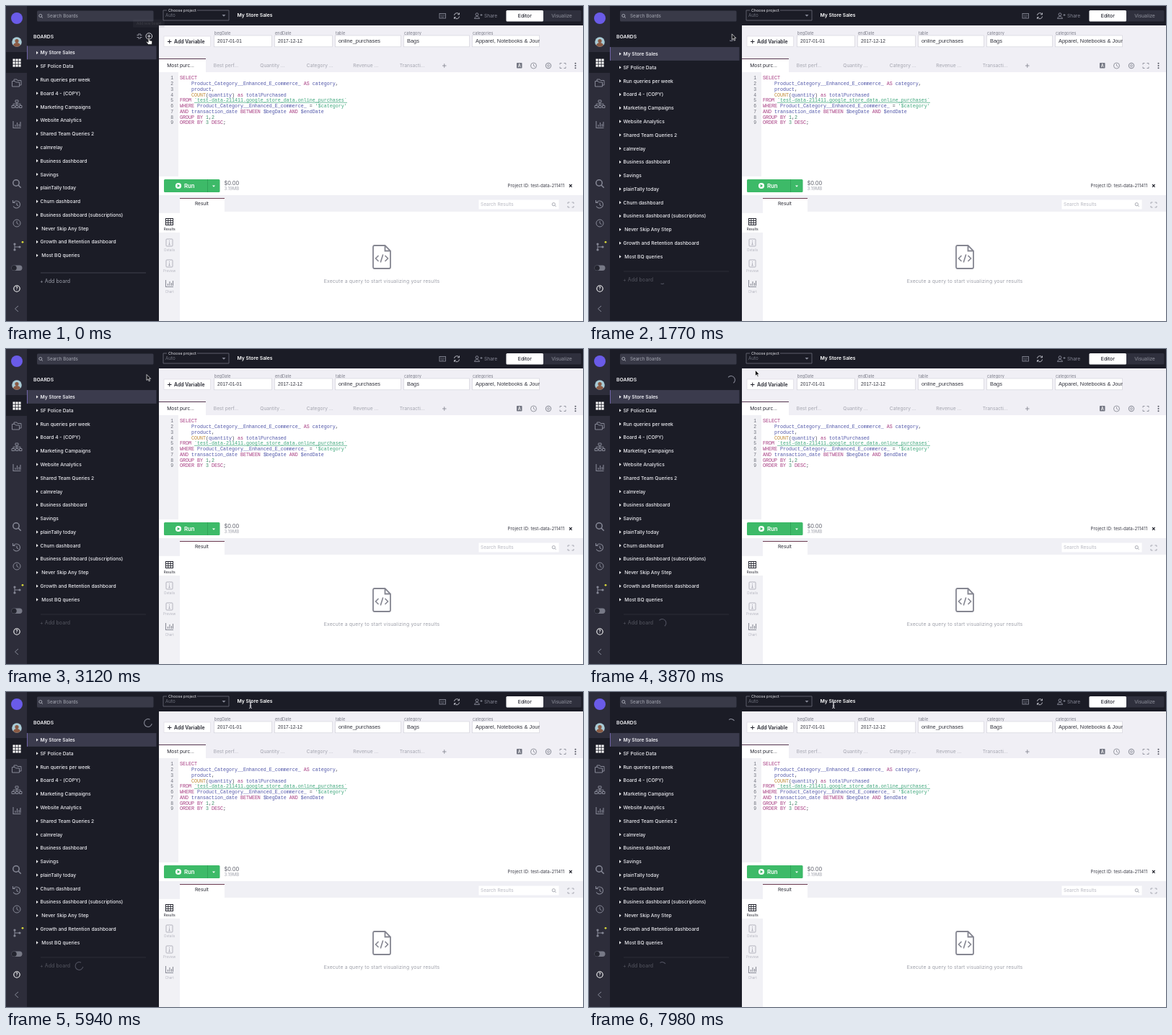
Recreate the animation shown at these times as an HTML page. Size 800x438 px, loop 8 s.

```html
<!DOCTYPE html>
<html lang="en">
<head>
<meta charset="utf-8">
<title>Query editor</title>
<style>
html, body { margin: 0; height: 100%; overflow: hidden; background: #fff; }
svg { display: block; width: 100vw; height: 100vh; font-family: Inter, "Liberation Sans", sans-serif; }
text { white-space: pre; }
.mono { font-family: "Liberation Mono", "DejaVu Sans Mono", monospace; }
.arial { font-family: "Liberation Sans", sans-serif; }
</style>
</head>
<body>
<svg id="stage" viewBox="0 0 800 438"></svg>
<script>
const LOOP = 8000, LOAD = 1390, SPIN = 434;
const GREY = '#868896', DIM = '#b3b3bd', INK = '#24252f';
const stage = document.getElementById('stage');

// Builders; text is placed by its vertical middle.
const esc = s => s.replace(/&/g, '&amp;').replace(/</g, '&lt;');
const text = (x, y, s, size, fill, more = '') =>
  `<text x="${x}" y="${y + size * .36}" font-size="${size}" fill="${fill}" ${more}>${esc(s)}</text>`;
const rect = (x, y, w, h, fill, more = '') =>
  `<rect x="${x}" y="${y}" width="${w}" height="${h}" fill="${fill}" ${more}/>`;
const line = (d, stroke, w = 1, more = '') =>
  `<path d="${d}" fill="none" stroke="${stroke}" stroke-width="${w}" ${more}/>`;
const shape = (d, fill, more = '') => `<path d="${d}" fill="${fill}" ${more}/>`;
const ring = (x, y, r, stroke, w = 1) =>
  `<circle cx="${x}" cy="${y}" r="${r}" fill="none" stroke="${stroke}" stroke-width="${w}"/>`;
const disc = (x, y, r, fill) => `<circle cx="${x}" cy="${y}" r="${r}" fill="${fill}"/>`;
const BOLD = 'font-weight="600"', MEDIUM = 'font-weight="500"', MID = 'text-anchor="middle"';

// Icons
const lens = (x, y, r, c, w) => ring(x, y, r, c, w) +
  line(`M${x + r * .7} ${y + r * .7}l${r * .9} ${r * .9}`, c, w);
const clock = (x, y, r, c) => ring(x, y, r, c) + line(`M${x} ${y - r * .6}V${y}l${r * .5} ${r * .35}`, c);
const bars = (x, y, c) =>
  line(`M${x - 5} ${y - 5}v9.5h10.5M${x - 2} ${y + 3}v-3M${x + .5} ${y + 3}v-6M${x + 3} ${y + 3}v-4M${x + 5} ${y + 3}v-7`, c, 1.1);
const grid = (x, y, c) => rect(x - 5, y - 4.5, 10, 9, 'none', `stroke="${c}"`) +
  line(`M${x - 5} ${y - 1.5}h10m-10 3h10M${x - 1.7} ${y - 4.5}v9m3.4 -9v9`, c, .9);
const corners = (x, y, c) =>
  line(`M${x - 4} ${y - 1.5}v-2h2.5m3 0h2.5v2m0 3v2h-2.5m-3 0h-2.5v-2`, c, .9);
const info = (x, y) => rect(x - 4.5, y - 5, 9, 10, 'none', `stroke="${DIM}" rx="1"`) +
  line(`M${x} ${y - 3}v1.3m0 1v3.6m-1.3 0h2.6`, DIM, 1);

function rail() {
  let s = rect(0, 0, 29, 438, '#2d2d3a') + rect(0, 64, 29, 29, '#1c1d27');
  s += disc(15, 17, 8, '#6a5be8');
  s += disc(15, 50, 6.8, '#a9cbd6') + disc(15, 48.5, 2.6, '#8a5a44') + shape('M10 54.5q1-3.6 5-3.6t5 3.6q-5 4.500-10 0z', '#8a5a44');
  for (let i = 0; i < 9; i++) s += rect(9.5 + i % 3 * 4, 73.5 + (i / 3 | 0) * 4, 3.1, 3.1, '#fff');
  s += line('M11 104v-2h4l1 1.500h5v6.500h-2M8.500 104.500h4l1 1.500h5v6h-10z', GREY);
  s += line('M13 131h4v3h-4zM8 138.500h4v3h-4zM13.500 138.500h3.500v3h-3.500zM18.500 138.500h3.500v3h-3.500zM15 134v4.500M10 138.500v-2.300h10v2.300', GREY);
  s += bars(15, 165, GREY) + lens(14, 246, 4.2, GREY, 1.5);
  s += line('M10.500 273a5 5 0 1 1-.300 5.500M9.500 270v3.500h3.500M15 273.500v3l2 1.200', GREY, 1.1) + clock(15, 302, 5, GREY);
  s += line('M12 332v6M12 335h6', GREY) + disc(12, 331, 1.6, GREY) + disc(12, 339, 1.6, GREY) + disc(19, 335, 1.6, GREY) + disc(23, 328.3, 1.4, '#d9d83a');
  s += rect(7.5, 360.5, 15, 7.5, '#777986', 'rx="3.700"') + disc(11.2, 364.2, 3.5, '#24252f');
  s += ring(15, 393, 4.2, '#fff', 1.1) + text(15, 393, '?', 6.2, '#fff', `${BOLD} ${MID}`);
  return s + line('M17 417l-4.500 4 4.500 4', GREY);
}

function boards() {
  const names = ['My Store Sales', 'SF Police Data', 'Run queries per week', 'Board 4 - (COPY)',
    'Marketing Campaigns', 'Website Analytics', 'Shared Team Queries 2', 'calmrelay',
    'Business dashboard', 'Savings', 'plainTally today', 'Churn dashboard',
    'Business dashboard (subscriptions)', ' Never Skip Any Step', 'Growth and Retention dashboard', ' Most BQ queries'];
  let s = rect(29, 0, 183, 438, '#1b1c26') + rect(43, 6.5, 161.5, 15, '#393a48', 'rx="1.500"');
  s += lens(47.8, 13.5, 2, '#aeb0bb', .9) + text(57, 14, 'Search Boards', 6.2, '#a9abb6');
  s += text(38, 43, 'BOARDS', 6.8, '#f2f2f6', BOLD);
  s += '<g id="list">' + rect(29, 55.5, 179.5, 18.8, '#3b3b4d') + rect(29, 55.5, 1, 18.8, '#7064a8');
  names.forEach((name, i) => {
    const y = 65 + i * 18.79;
    s += shape(`M42 ${y - 2.2}l2.700 2.200-2.700 2.200z`, '#eee') +
      text(47.5, y, name, 6.7, '#eeeef3', i ? MEDIUM : BOLD);
  });
  s += '</g><g id="tools">' + line('M181.500 40.500h2.500v-2.500M188.500 40.500h-2.500v-2.500M181.500 43.500h2.500v2.500M188.500 43.500h-2.500v2.500', '#a5a6b2', .9);
  s += ring(198.3, 42, 4.3, '#d5d5dc') + line('M196 42h4.600M198.300 39.700v4.600', '#d5d5dc') + '</g>';
  return s + '<g id="add">' + line('M48 371H194', '#494a57', .8) + text(47, 382.4, '+ Add board', 7, '#9b9da8', 'letter-spacing=".08"') + '</g>';
}

function header() {
  let s = rect(212, 0, 588, 27, '#1b1c26') + line('M223 6h-5v14h91V6h-44', '#656673', .9);
  s += text(225, 6.5, 'Choose project', 5.4, '#e3e3e8') + text(221, 13.2, 'Auto', 6.3, '#6e707c') + shape('M299.500 12h5l-2.500 2.800z', GREY);
  s += text(320.5, 12.3, 'My Store Sales', 6.8, '#fff', BOLD);
  s += rect(601, 10.5, 8.5, 6.5, 'none', `stroke="${GREY}" stroke-width=".9"`) + line('M602.500 12.700h6m-6 1.500h6M603.500 15.700h3.500', GREY, .7, 'stroke-dasharray="1 .600"');
  s += line('M621.500 13a3.600 3.600 0 0 1 6.700-1.500M628.500 14.500a3.600 3.600 0 0 1-6.700 1.500M628.500 9.500v2.300h-2.400M621.500 18v-2.300h2.400', '#b6b7c0');
  s += ring(653, 11.7, 1.9, GREY) + line('M649.500 17.500q0-2.800 3.500-2.800t3.500 2.800zM657.500 12.500h3M659 11v3', GREY, .9);
  s += text(663, 14, 'Share', 6.6, GREY);
  s += rect(693.5, 6, 104, 15.5, '#2f303d', 'rx="1.500"') + rect(693.5, 6, 51.5, 15.5, '#fff', 'rx="1.500"');
  return s + text(719.3, 14, 'Editor', 6.8, INK, `${MEDIUM} ${MID}`) + text(770.5, 14, 'Visualize', 6.8, '#92949f', MID);
}

function variables() {
  let s = rect(212, 27, 588, 65, '#f0eff5');
  s += rect(219, 42, 64.5, 14.5, '#fff', 'stroke="#d9d8e0" stroke-width=".600"') + line('M224 49.500h5.500M226.750 46.700v5.600', INK) + text(233, 49.5, 'Add Variable', 6.9, INK, BOLD);
  [['begDate', '2017-01-01', 288.5, 80, 6.65], ['endDate', '2017-12-12', 372.5, 80, 6.65],
   ['table', 'online_purchases', 456.5, 91, 7.4], ['category', 'Bags', 551.5, 91, 7.4],
   ['categories', 'Apparel, Notebooks & Jour', 646.5, 93, 7.45]].forEach(([label, value, x, w, size]) => {
    s += text(x + .5, 38, label, 5.5, '#777985', 'letter-spacing=".100"') +
      rect(x, 41, w, 15.8, '#fff', 'stroke="#d4d3dc" stroke-width=".700"') +
      text(x + 4.5, 48.7, value, size, '#33343e', 'class="arial"');
  });
  s += rect(740, 40, 60, 18, '#f0eff5') + rect(212, 73, 65, 19, '#fff') + rect(212, 73, 65, 1, '#56374f');
  ['Most purc...', 'Best perf...', 'Quantity ...', 'Category ...', 'Revenue ...', 'Transacti...'].forEach((t, i) => {
    s += text(223.3 + i * 64.5, 83, t, 6.7, i ? '#a5a6b0' : INK);
  });
  s += line('M605 83h5.500M607.750 80.200v5.600', '#888a95', .9);
  s += rect(708, 79, 7.5, 7.5, '#737682', 'rx=".800"') + text(711.75, 82.8, 'A', 5.5, '#fff', `${BOLD} ${MID}`);
  s += clock(731.5, 83, 4, '#9698a2') + ring(752, 83, 1.4, '#9698a2', .9) + ring(752, 83, 3.6, '#9698a2', 1.2);
  s += corners(772, 83, '#8c8e99');
  return s + [79.8, 83, 86.2].map(y => disc(789.5, y, 1, '#51535e')).join('');
}

function code() {
  const sql = [
    'SELECT',
    '    Product_Category__Enhanced_E_commerce_ AS category,',
    '    product,',
    '    COUNT(quantity) as totalPurchased',
    'FROM `test-data-211411.google_store_data.online_purchases`',
    "WHERE Product_Category__Enhanced_E_commerce_ = '$category'",
    'AND transaction_date BETWEEN $begDate AND $endDate',
    'GROUP BY 1,2',
    'ORDER BY 3 DESC;'];
  const token = /(`.*`|'.*')|\b(SELECT|AS|as|FROM|WHERE|AND|BETWEEN|GROUP|ORDER|BY|DESC)\b|(COUNT)|(\b\d\b)|([$\w]+)/g;
  const colours = ['#3fa77c', '#a63a80', '#c08a35', '#3c8f6a', '#4f55a8'];
  let s = rect(212, 92, 588, 171, '#fff') + rect(212, 92, 27, 145, '#f1f1f5');
  sql.forEach((row, i) => {
    const y = 102.4 + i * 7.76;
    const body = row.replace(token, (m, ...g) => `<tspan fill="${colours[g.slice(0, 5).findIndex(Boolean)]}">${m}</tspan>`);
    s += `<text class="mono" x="241" y="${y}" font-size="6.667" fill="#444650">${body}</text>` +
      text(232, y - 2.3, String(i + 1), 6.4, '#6d6f7a', 'class="mono" text-anchor="end"');
  });
  s += line('M261 134.300H473', '#3fa77c', .7);
  s += rect(219, 241, 77.5, 18, '#3dba68', 'rx="1.500"') + line('M279.500 241v18', '#2e9d55', .8);
  s += disc(239, 250, 4.1, '#fff') + shape('M237.700 247.800l3.500 2.200-3.500 2.200z', '#3dba68') + text(247, 250.2, 'Run', 7.8, '#fff', BOLD) + shape('M286 249.500h4l-2 2.200z', '#fff');
  s += text(302.5, 246, '$0.00', 7.5, '#5c5e69') + text(302.5, 254, '3.19MB', 6.2, '#a1a3ad');
  return s + text(695.5, 249.7, 'Project ID: test-data-211411', 6.2, '#3b3c47') + line('M781 248l3.600 3.800M784.600 248l-3.600 3.800', INK, 1.1);
}

function results() {
  let s = rect(212, 263, 588, 23, '#f0f0f5') + rect(212, 286, 588, 152, '#fff') + rect(212, 286, 29, 152, '#f1f1f5');
  s += rect(241, 267, 62, 19, '#fff') + rect(241, 267, 62, 1, '#6b3a50') + text(271.5, 274.5, 'Result', 6.5, INK, MID);
  s += rect(655.5, 269.5, 111, 13, '#fff') + text(658, 276, 'Search Results', 6.5, '#b8b9c2') + lens(759.3, 275.7, 2.1, '#9fa1ab', .9) + corners(783, 276.5, '#a1a3ad');
  s += rect(212, 288, 29, 27, '#fff') + grid(226.5, 300, INK) + info(226.5, 329) + info(226.5, 358) + bars(226.5, 386, '#8c8e99');
  ['Results', 'Details', 'Preview', 'Chart'].forEach((t, i) => {
    s += text(226.7, 310.5 + i * 28.8, t, 4.6, i ? '#b5b6c0' : INK, MID);
  });
  s += line('M525.500 333H511q-2 0-2 2v28q0 2 2 2h20q2 0 2-2V340.500zM525.500 333v7.500h7.500', '#858691', 1.8);
  s += line('M516.500 347l-4 4 4 4M525.500 347l4 4-4 4M522.700 345.500l-3.400 11', '#858691', 1.6);
  return s + text(521, 383, 'Execute a query to start visualizing your results', 6.8, '#9d9fa9', `${MID} letter-spacing=".180"`);
}

const spinner = (x, y, c) => `<circle class="spin" cx="${x}" cy="${y}" r="5.400" fill="none" stroke="${c}" stroke-width="1" pathLength="125.600"/>`;
const overlay = () => spinner(197, 43, '#8d8f9d') + spinner(101.5, 381, '#555664') +
  '<g id="tip">' + rect(171, 16, 54, 13.8, '#616269', 'rx="1.500"') + text(198, 23, 'Add new board', 5.8, '#fff', `${BOLD} ${MID}`) + '</g>' +
  '<g id="hand">' + shape('M-.800 0q1-1 1.700 0v3.300l3 .700q.900.300.800 1.300l-.500 3.700h-5l-2.700-3.500q.300-1.300 1.500-.300l1.200.800z', '#fff', 'stroke="#111" stroke-width=".600"') + '</g>' +
  '<g id="arrow">' + shape('M0 0v8l1.900-1.700 1.400 3 1.300-.600-1.400-2.900h2.500z', '#0b0b10', 'stroke="#fff" stroke-width=".700"') + '</g>' +
  '<g id="beam">' + line('M-2-4.500q2 0 2 1.500v6q0 1.500-2 1.500M2-4.500q-2 0-2 1.500v6q0 1.500 2 1.500M-1.300 1.300h2.600', '#d8d8de', .9) + '</g>';

stage.innerHTML = header() + variables() + code() + results() + rail() + boards() + overlay();

const el = id => document.getElementById(id);
const clamp = v => Math.max(0, Math.min(1, v));
const ease = v => v * v * (3 - 2 * v);
const path = [[0, 198, 44.5], [60, 198, 44.5], [450, 198.5, 38.5], [2500, 198, 39], [3050, 195, 35.5],
  [3600, 195, 35.5], [4450, 343, 10], [4900, 343, 10], [5500, 339, 18], [LOOP, 339, 18]];

function pointer(t) {
  const i = path.findIndex(p => p[0] > t), [t0, x0, y0] = path[i - 1], [t1, x1, y1] = path[i];
  const k = ease((t - t0) / (t1 - t0));
  return [x0 + (x1 - x0) * k, y0 + (y1 - y0) * k];
}

function draw(t) {
  const loading = t >= LOAD;
  const [x, y] = pointer(t);
  const cursor = !loading ? 'hand' : x > 320 ? 'beam' : 'arrow';
  for (const id of ['hand', 'arrow', 'beam']) {
    el(id).setAttribute('visibility', id === cursor ? 'visible' : 'hidden');
    el(id).setAttribute('transform', `translate(${x} ${y})`);
  }

  el('list').setAttribute('transform', `translate(0 ${loading ? 1.6 : 0})`);
  el('add').setAttribute('transform', `translate(0 ${loading ? -2 : 0})`);
  el('add').setAttribute('opacity', loading ? .45 : 1);
  el('tools').setAttribute('visibility', loading ? 'hidden' : 'visible');

  const shown = loading ? 1 - clamp((t - LOAD) / 150) : clamp(.12 + Math.max(0, t - 60) / 300);
  const size = .78 + .22 * shown;
  el('tip').setAttribute('opacity', shown);
  el('tip').setAttribute('transform', `translate(198 30) scale(${size}) translate(-198 -30)`);

  // The arc grows for half a turn, then its tail catches up.
  const phase = ((t - LOAD) / SPIN + 100) % 1;
  const grow = ease(clamp(phase * 2)), shrink = ease(clamp(phase * 2 - 1));
  const start = 15 * grow + 110 * shrink;
  const length = Math.min(100 * grow, 125.6 - start);
  for (const c of document.querySelectorAll('.spin')) {
    const turn = 155 + 360 * phase + start / 125.6 * 360;
    c.setAttribute('visibility', loading && length > 1 ? 'visible' : 'hidden');
    c.setAttribute('stroke-dasharray', `${length} 200`);
    c.setAttribute('transform', `rotate(${turn} ${c.getAttribute('cx')} ${c.getAttribute('cy')})`);
  }
}

const begin = performance.now();
function tick() {
  draw((performance.now() - begin) % LOOP);
  requestAnimationFrame(tick);
}
tick();
</script>
</body>
</html>
```
